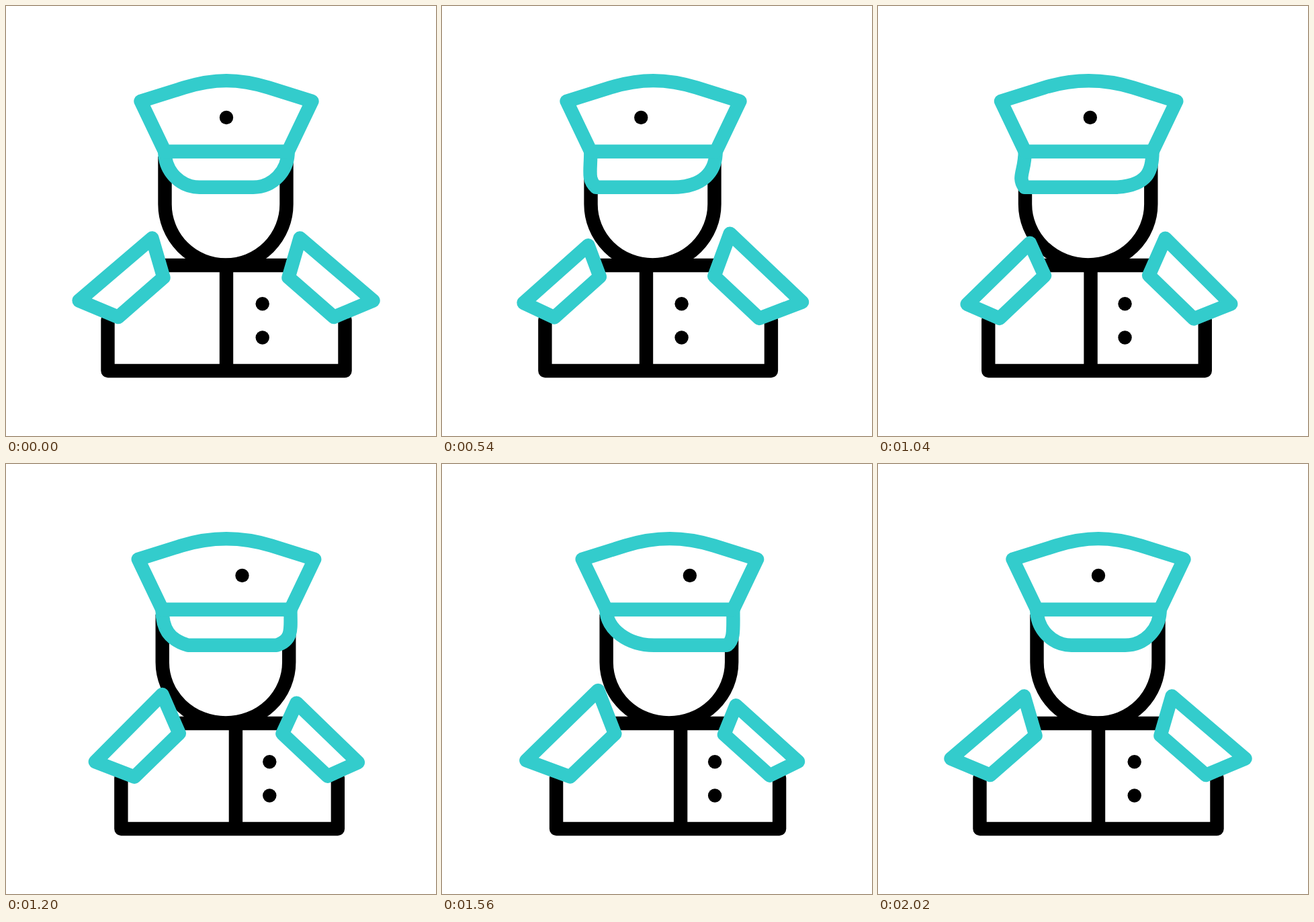
These frames come from a looping animation (640x640 px, 2220 ms). An HTML page:

```html
<!DOCTYPE html>
<html lang="en">
<head>
<meta charset="utf-8">
<title>Officer turning his head</title>
<style>
  html, body { margin: 0; height: 100%; overflow: hidden; background: #fff; }
  svg { display: block; width: 100%; height: 100%; }
  path { fill: none; stroke: #000; stroke-width: 20.4; stroke-linejoin: round; }
  .teal { fill: #fff; stroke: #33cccc; }
</style>
</head>
<body>
<svg viewBox="0 0 640 640">
  <path id="head"/>
  <path id="coat" stroke-linecap="round"/>
  <path id="seams"/>
  <path id="visor" class="teal"/>
  <path id="cap" class="teal"/>
  <path id="left" class="teal"/>
  <path id="right" class="teal"/>
  <circle id="badge" cy="166" r="10.2"/>
  <circle id="button1" cy="443.3" r="10.2"/>
  <circle id="button2" cy="493.5" r="10.2"/>
</svg>
<script>
const LOOP = 2220;
const TURNS = [200, 832, 1362, 2000]; // front, turned left, turned right, front
const MIDDLE = 328;

const lerp = (a, b, u) => a + (b - a) * u;
const el = id => document.getElementById(id);
const draw = (id, d) => el(id).setAttribute("d", d);
const moveX = (id, x) => el(id).setAttribute("cx", x);

// Returns a mixer of (front, left, right) values at time t, with one easing power per turn.
function turning(t, powers) {
  const i = TURNS.findIndex(end => t < end) - 1;
  if (i < 0) return front => front;
  const u = ((t - TURNS[i]) / (TURNS[i + 1] - TURNS[i])) ** powers[i];
  return (...poses) => lerp(poses[i], poses[(i + 1) % 3], u);
}

// One shoulder: side is -1 for the left and 1 for the right.
// "Near" is the pose turned away from this side, "far" the pose turned towards it.
function drawShoulder(id, side, body) {
  const pose = (front, near, far) => side < 0 ? body(front, far, near) : body(front, near, far);
  const lean = pose(0, 2.5, 0);
  const corner = (x, y) => [MIDDLE - .5 + side * pose(...x) + lean, pose(...y)];
  const top = corner([110, 91, 110], [345.5, 333, 365.5]);
  const inner = corner([93, 62.4, 92.3], [404, 400.4, 401.8]);
  const bottom = corner([160.5, 128.5, 160], [463, 466.6, 463.8]);
  const outer = corner([219, 197, 195], [438.5, 442.5, 444.8]);
  draw(id, `M${[top, inner, bottom, outer]}Z`);
  return {
    neck: lerp(top[0], inner[0], .7),
    hem: MIDDLE + side * pose(176.5, 149.5, 173)
  };
}

function drawBody(body) {
  const left = drawShoulder("left", -1, body);
  const right = drawShoulder("right", 1, body);
  draw("coat", `M${left.hem} 467V543H${right.hem}V467`);
  draw("seams", `M${left.neck} 386H${right.neck}M${body(MIDDLE, 283.5, 367.4)} 386V543`);
  const button = body(381.7, 335.2, 417.2);
  moveX("button1", button);
  moveX("button2", button);
  moveX("badge", body(MIDDLE, 269.2, 387.4));
}

function drawHead(face) {
  const center = face(MIDDLE, 303, 346);
  const grow = face(0, 2.7, 4.5);
  const x = out => center + out + Math.sign(out) * grow;

  const [cheek1, cheek2] = [x(-90.5) - 1, x(90.5) - 1];
  draw("head", `M${cheek1} 224V295A${90.5 + grow} 90.5 0 0 0 ${cheek2} 295V224`);

  draw("cap", `M${x(-127.5)} 141.7L${x(-63)} 121.5C${x(-18)} 107.6 ${x(18)} 107.6 ${x(63)} 121.5` +
    `L${x(127.5)} 141.7L${x(91.7)} 216.5H${x(-91.7)}Z`);

  // The visor's leading corner flicks out while the other side flattens.
  const end1 = face(288, 179, 337), end2 = face(368, 322, 461);
  const bend1 = `${face(259, 180, 289)} ${face(269.7, 249, 271)}`;
  const bend2 = `${face(397, 382, 460)} ${face(269.7, 269.7, 256)}`;
  draw("visor", `M${x(-91.7)} 216.5C${x(-91.7)} 246 ${bend1} ${end1} 269.7` +
    `H${end2}C${bend2} ${x(91.7)} 246 ${x(91.7)} 216.5Z`);
}

const start = performance.now();
function tick() {
  const t = (performance.now() - start) % LOOP;
  drawBody(turning(t, [1, 1, 1]));
  drawHead(turning(t, [1, 1.5, .8]));
  requestAnimationFrame(tick);
}
tick();
</script>
</body>
</html>
```
